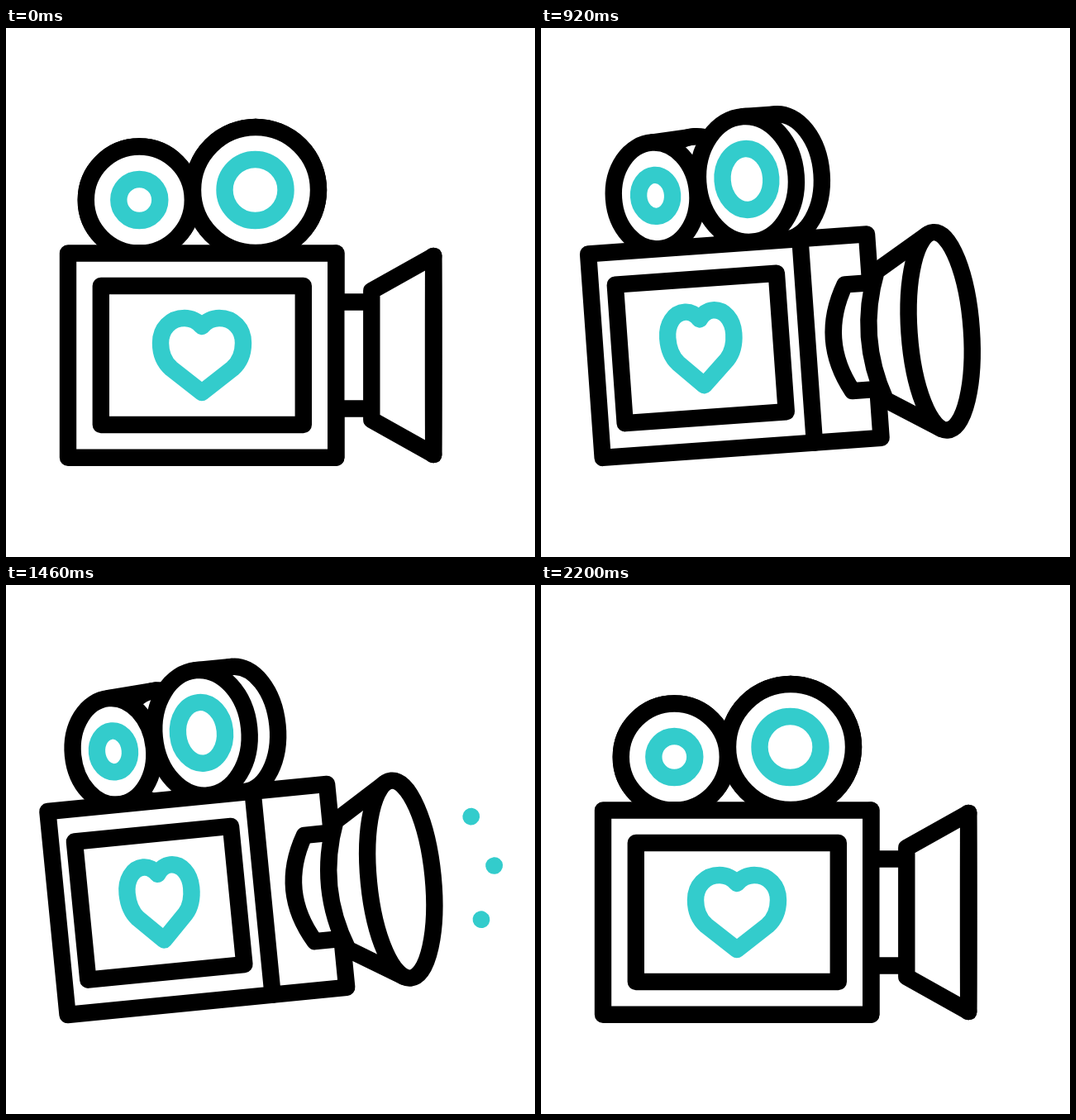
These frames come from a looping animation (640x640 px, 2400 ms). An HTML page with a canvas:

```html
<!DOCTYPE html>
<html lang="en">
<head>
<meta charset="utf-8">
<title>Film camera</title>
<style>
  html, body { margin: 0; width: 100%; height: 100%; overflow: hidden; background: #fff; }
  canvas { display: block; width: 640px; height: 640px; }
</style>
</head>
<body>
<canvas id="stage" width="640" height="640"></canvas>
<script>
const ctx = document.getElementById('stage').getContext('2d');
const LOOP = 2400, STEP = 20;
const BLACK = '#000', TEAL = '#33cccc', WHITE = '#fff';
const PIVOT = { x: 78, y: 524.5 };
const TILT = 12 * Math.PI / 180;

// Rays in camera space: inner end, outer end
const RAYS = [
  [555, 348.5, 584.5, 328.5],
  [571, 390.5, 606.5, 390.5],
  [555, 432.5, 584.5, 454]
];

function ease(t, from, to) {
  const x = Math.min(1, Math.max(0, (t - from) / (to - from)));
  return x * x * (3 - 2 * x);
}

function shape(color, fill, trace) {
  ctx.beginPath();
  trace();
  if (fill) {
    ctx.fillStyle = WHITE;
    ctx.fill();
  }
  ctx.strokeStyle = color;
  ctx.stroke();
}

function oval(x, y, rx, ry, color = BLACK) {
  shape(color, true, () => ctx.ellipse(x, y, Math.max(rx, 0.3), ry, 0, 0, Math.PI * 2));
}

function box(x1, y1, x2, y2) {
  shape(BLACK, true, () => ctx.rect(x1, y1, x2 - x1, y2 - y1));
}

function line(x1, y1, x2, y2, color = BLACK) {
  shape(color, false, () => {
    ctx.moveTo(x1, y1);
    ctx.lineTo(x2, y2);
  });
}

function drawRays(t) {
  const head = ease(t, 960, 1260);
  const tail = ease(t, 1200, 1480);
  if (head <= 0 || t >= 1500) return;
  for (const [x1, y1, x2, y2] of RAYS) {
    const dx = x2 - x1, dy = y2 - y1;
    line(x1 + dx * tail, y1 + dy * tail, x1 + dx * head + 0.01, y1 + dy * head, TEAL);
  }
}

function drawReel(front, back) {
  oval(back.x, front.y, back.rx, back.ry);
  line(front.x, front.y - front.ry, back.x, front.y - back.ry);
}

function drawReels(p) {
  const small = { x: 161.3, y: 208, rx: 64.5 - 15.3 * p, ry: 64.5 };
  const big = { x: 302 - 32 * p, y: 196, rx: 76 - 18.5 * p, ry: 76 };

  drawReel(small, { x: small.x + 58 * p, rx: 64.5 - 13 * p, ry: 64.5 + 4 * p });
  drawReel(big, { x: 302 + 12 * p, rx: 76 - 28 * p, ry: 76 });

  oval(small.x, small.y, small.rx, small.ry);
  oval(big.x, big.y, big.rx, big.ry);
  oval(small.x, small.y, 25 - 5 * p, 25, TEAL);
  oval(big.x - 0.5, big.y, 37 - 8.5 * p, 37, TEAL);
}

function drawHeart(p) {
  const cx = 237 - 37 * p, cy = 381, k = 1 - 0.22 * p;
  const curve = (...pts) =>
    ctx.bezierCurveTo(...pts.map((v, i) => i % 2 ? cy + v : cx + k * v));
  shape(TEAL, true, () => {
    ctx.moveTo(cx, cy + 60);
    ctx.lineTo(cx - 37 * k, cy + 31);
    curve(-45, 24, -50, 13, -50, 0);
    curve(-50, -17, -38, -30, -21, -30);
    curve(-13, -30, -5, -26, 0, -20);
    curve(5, -26, 13, -30, 21, -30);
    curve(38, -30, 50, -17, 50, 0);
    curve(50, 13, 45, 24, 37, 31);
    ctx.closePath();
  });
}

function drawBody(p) {
  const split = 399.3 - 75 * p;
  box(75, 272.5, 399.3 + 15 * p, 519.7);
  line(split, 272.5, split, 519.7);
  box(114.8 - 11 * p, 312, 359.8 - 66 * p, 480);
  drawHeart(p);
}

// Side wall: two edges joined by a curve that bulges to the left
function wall(right, top, left, bulge, flare) {
  const bottom = 792 - top;
  shape(BLACK, true, () => {
    ctx.moveTo(right, top - flare);
    ctx.lineTo(left, top);
    ctx.quadraticCurveTo(left - 2 * bulge, 396, left, bottom);
    ctx.lineTo(right, bottom + flare);
  });
}

function drawLens(p) {
  const cx = 517.3 - 25 * p;
  const rx = 39 * p + 8 * p * (1 - p);
  wall(442 - 27 * p, 331.5, 399.3 - 18 * p, 19 * p, 0);
  wall(cx - 0.2 * rx, 318, 442.3 - 22 * p, 15 * p, 42 - 2.4 * p);
  oval(cx, 396, rx, 120);
}

function draw(t) {
  const turn = ease(t, 190, 1100) - ease(t, 1525, 2200);
  const lensTurn = ease(t, 210, 1020) - ease(t, 1515, 2190);
  const tilt = ease(t, 740, 1200) - ease(t, 1220, 1680);

  ctx.setTransform(1, 0, 0, 1, 0, 0);
  ctx.fillStyle = WHITE;
  ctx.fillRect(0, 0, 640, 640);
  ctx.lineWidth = 20.4;
  ctx.lineCap = ctx.lineJoin = 'round';

  ctx.translate(PIVOT.x, PIVOT.y);
  ctx.rotate(-TILT * tilt);
  ctx.translate(-PIVOT.x, -PIVOT.y);

  drawRays(t);
  drawReels(turn);
  drawBody(turn);
  drawLens(lensTurn);
}

const start = performance.now();
function tick() {
  const t = (performance.now() - start) % LOOP;
  draw(Math.floor(t / STEP) * STEP);
  requestAnimationFrame(tick);
}
tick();
</script>
</body>
</html>
```
